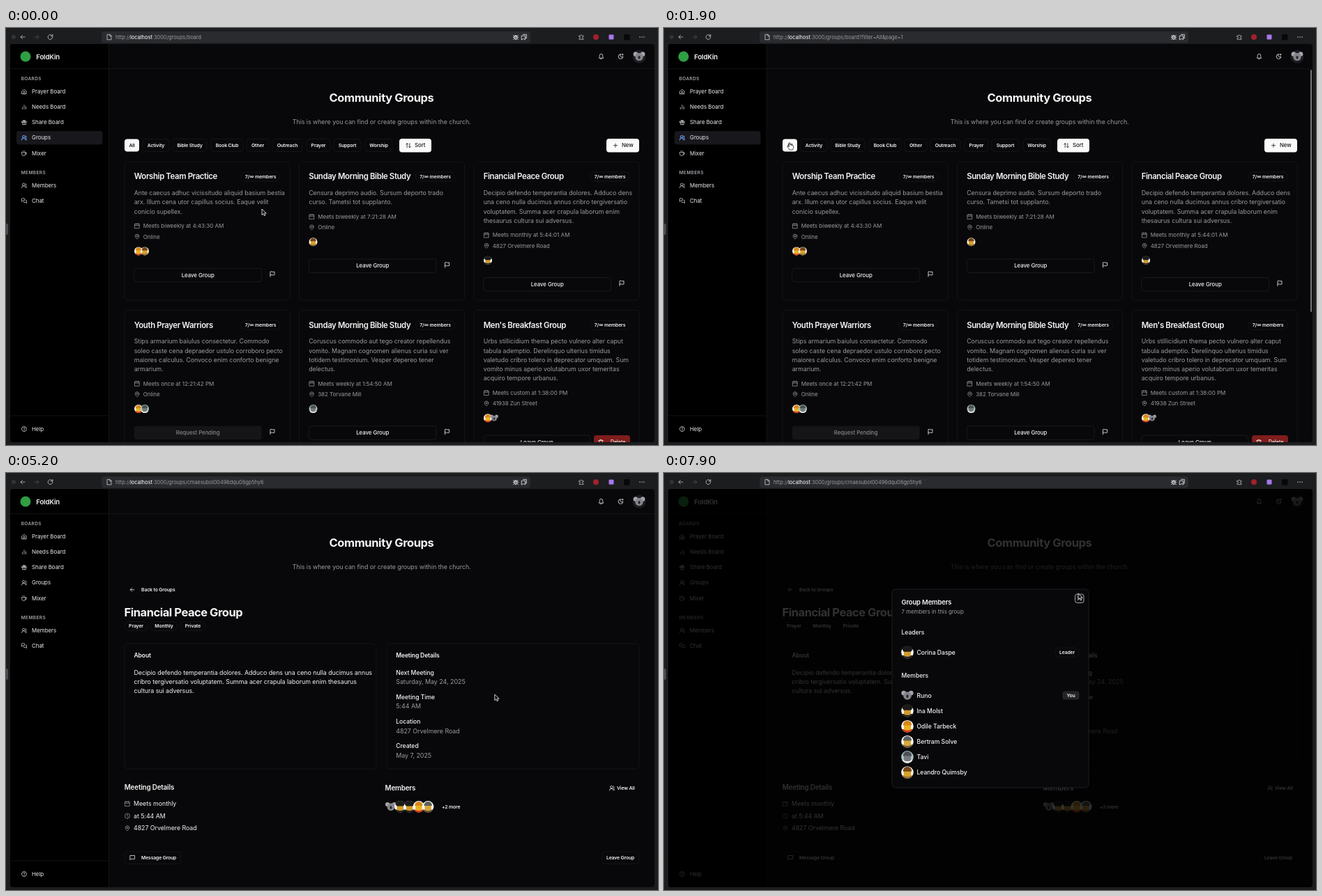
An HTML page that plays this animation: 935x599 px, repeating every 8000 ms.

```html
<!DOCTYPE html>
<html lang="en">
<head>
<meta charset="utf-8">
<title>Community Groups</title>
<style>
html, body { margin: 0; width: 100%; height: 100%; overflow: hidden; background: #1b1d1f; }
svg { display: block; width: 935px; height: 599px; font-family: Inter, "Liberation Sans", sans-serif; }
text { white-space: pre; }
</style>
</head>
<body>
<svg id="stage" viewBox="0 0 935 599"></svg>
<script>
const WHITE = '#f4f4f5', GRAY = '#9a9aa0', BG = '#08080a', LINE = '#19191d';

const ICONS = {
  home: 'M3 10l9-7 9 7v11H3zM9 21v-9h6v9',
  bars: 'M5 20v-6M12 20V4M19 20V10',
  gift: 'M3 8h18v4H3zM5 12v9h14v-9M12 8v13M12 8C6 8 6 3 9 3s3 5 3 5 0-5 3-5 3 5-3 5',
  users: 'M2 21a8 8 0 0 1 16 0M10 13a5 5 0 1 0 0-10 5 5 0 0 0 0 10M22 20c0-3-2-6-4-7a5 5 0 0 0 0-9',
  cup: 'M3 8h14v9a4 4 0 0 1-4 4H7a4 4 0 0 1-4-4zM17 8h1a4 4 0 0 1 0 8h-1M7 2v2M13 2v2',
  chat: 'M14 9a2 2 0 0 1-2 2H6l-4 4V4a2 2 0 0 1 2-2h8a2 2 0 0 1 2 2zM18 9h2a2 2 0 0 1 2 2v11l-4-4h-6a2 2 0 0 1-2-2v-1',
  help: 'M12 22a10 10 0 1 0 0-20 10 10 0 0 0 0 20M9 9a3 3 0 0 1 6 1c0 2-3 2-3 4M12 17v.5',
  calendar: 'M3 4h18v18H3zM3 10h18M8 2v4M16 2v4',
  pin: 'M20 10c0 6-8 12-8 12s-8-6-8-12a8 8 0 0 1 16 0M12 13a3 3 0 1 0 0-6 3 3 0 0 0 0 6',
  flag: 'M4 22V3c4-3 8 3 16 0v12c-8 3-12-3-16 0',
  bell: 'M4 17c2-3 2-5 2-9a6 6 0 0 1 12 0c0 4 0 6 2 9zM10 21h4',
  moon: 'M12 3a6 6 0 0 0 9 9 9 9 0 1 1-9-9M19 2v5M16.5 4.5h5',
  clock: 'M12 22a10 10 0 1 0 0-20 10 10 0 0 0 0 20M12 6v6l4 2',
  message: 'M21 3H3v18l4-4h14z',
  left: 'M20 12H4M11 5l-7 7 7 7',
  right: 'M4 12h16M13 5l7 7-7 7',
  reload: 'M20 12a8 8 0 1 1-3-6.2l3 3M20 3v6h-6',
  sort: 'M7 20V4M3 8l4-4 4 4M17 4v16M13 16l4 4 4-4',
  plus: 'M5 12h14M12 5v14',
  trash: 'M3 6h18M6 6v15h12V6M9 6V3h6v3',
  close: 'M6 6l12 12M18 6L6 18',
  file: 'M5 2h10l5 5v15H5zM14 2v6h6',
  reader: 'M4 2h16v20H4zM8 7h8M8 12h8M8 17h8',
  bug: 'M7 9h10v7a5 5 0 0 1-10 0zM8 9a4 4 0 0 1 8 0M2 13h5M17 13h5M3 5l4 4M21 5l-4 4M3 21l4-3M21 21l-4-3M12 10v11',
  pages: 'M8 2h13v15l-4-3M3 7h13v15l-6-4-7 4z',
  puzzle: 'M4 7h5a3 3 0 1 1 6 0h5v5a3 3 0 1 0 0 5v4H4v-5a3 3 0 1 0 0-5z'
};

// Markup helpers; cy is the visual middle of a line of text.
const text = (x, cy, str, size = 8.85, fill = WHITE, weight = 400, attrs = '', spacing = weight < 600 ? -.005 : -.018) =>
  `<text x="${x}" y="${cy + size * .35}" font-size="${size}" fill="${fill}" font-weight="${weight}" letter-spacing="${spacing}em" ${attrs}>${str}</text>`;
const mid = (x, cy, str, size, fill, weight, spacing) => text(x, cy, str, size, fill, weight, 'text-anchor="middle"', spacing);
const box = (x, y, w, h, fill = 'none', stroke = 'none', r = 4) =>
  `<rect x="${x}" y="${y}" width="${w}" height="${h}" rx="${r}" fill="${fill}" stroke="${stroke}" stroke-width=".8"/>`;
const dot = (x, y, r, fill) => `<circle cx="${x}" cy="${y}" r="${r}" fill="${fill}"/>`;
const line = d => `<path d="${d}" stroke="${LINE}" fill="none" stroke-width=".8"/>`;
const icon = (name, x, y, size = 9, color = WHITE) =>
  `<path d="${ICONS[name]}" transform="translate(${x - size / 2} ${y - size / 2}) scale(${size / 24})" fill="none" stroke="${color}" stroke-width="2.1" stroke-linecap="round" stroke-linejoin="round"/>`;
const group = (id, body, attrs = '') => `<g id="${id}" ${attrs}>${body}</g>`;
const badge = (x, cy, w, str) =>
  box(x, cy - 6.5, w, 13, BG, LINE, 6) + mid(x + w / 2, cy, str, 6.85, WHITE, 600);

// Avatars: backdrop, head, hair, clothes
const LOOKS = {
  brown: ['#f3efe6', '#d9a027', '#714518', '#8a6a3a'],
  red: ['#fff', '#eab320', '#d9881a', '#d6351d'],
  dark: ['#fff', '#d09a2c', '#1c1a18', '#242220'],
  gray: ['#fff', '#d9a838', '#5c6058', '#6b5a3a'],
  pale: ['#a9c4c6', '#77797c', '#4c5055', '#ecefee']
};
function avatar(x, y, r, kind) {
  const at = `<g transform="translate(${x} ${y}) scale(${r})">`;
  if (kind === 'koala') return at + dot(-.6, -.4, .38, '#a5a5ad') + dot(.6, -.4, .38, '#a5a5ad') +
    dot(0, .05, .66, '#84848d') + '<ellipse cy=".15" rx=".18" ry=".28" fill="#26262b"/></g>';
  const [back, head, hair, body] = LOOKS[kind];
  const top = kind === 'dark' ? 'M-.87-.5A1 1 0 0 1 .87-.5L.6-.1H-.6z' : 'M-.7-.15C-.75-1.15 .75-1.15 .7-.15z';
  return at + dot(0, 0, 1, back) + `<path d="M-.87 .5A1 1 0 0 0 .87 .5z" fill="${body}"/>` +
    box(-.58, -.6, 1.16, 1.3, head, 'none', .4) + `<path d="${top}" fill="${hair}"/></g>`;
}

function chips(active) {
  const list = [['All', 170, 21], ['Activity', 196, 38], ['Bible Study', 239, 49], ['Book Club', 294, 46], ['Other', 345, 32],
    ['Outreach', 382, 43], ['Prayer', 431, 34], ['Support', 470, 39], ['Worship', 515, 39]];
  return list.map(([name, x, w]) => {
    const on = name === active;
    return box(x, 159.5, w, 18, on ? '#fafafa' : BG, on ? 'none' : LINE) + mid(x + w / 2, 168.7, name, 6.85, on ? '#18181b' : WHITE, 600);
  }).join('') +
    box(564, 159, 46, 19.5, '#fafafa') + icon('sort', 577, 168.7, 9, '#18181b') + text(586, 168.7, 'Sort', 7.8, '#18181b', 500) +
    box(861, 159, 47, 19.5, '#fafafa') + icon('plus', 874, 168.7, 9, '#18181b') + text(883, 168.7, 'New', 7.8, '#18181b', 500);
}

function card(x, y, [title, body, when, where, faces, mode]) {
  const lines = body.split('|'), last = y + 45 + (lines.length - 1) * 13.25, tx = x + 13.7;
  let out = box(x, y, 237, 199, BG, LINE, 5) +
    text(tx, y + 21.5, title, 11.4, WHITE, 600, 'class="title"', -.033) +
    badge(x + 167, y + 21.5, 56, '7/∞ members') +
    lines.map((s, i) => text(tx, y + 45 + i * 13.25, s, 8.87, GRAY)).join('') +
    icon('calendar', x + 18, last + 20.7, 8.5, GRAY) + text(x + 26.7, last + 20.7, 'Meets ' + when, 8.1, GRAY) +
    icon('pin', x + 18, last + 36.2, 8.5, GRAY) + text(x + 26.7, last + 36.2, where, 8, GRAY) +
    faces.split(' ').map((k, i) => avatar(x + 20 + i * 9, last + 57, 6, k)).join('');
  const by = last + 91.5, pending = mode === 'pending', owner = mode === 'owner', w = owner ? 153 : 183;
  out += box(tx, by - 9.75, w, 19.5, pending ? '#151518' : BG, pending ? 'none' : '#1f1f25') +
    mid(tx + w / 2, by, pending ? 'Request Pending' : 'Leave Group', 7.85, pending ? '#85858c' : WHITE, 500);
  return out + (owner
    ? box(x + 172, by - 9.75, 52, 19.5, '#7f1d1d') + icon('trash', x + 182, by, 9) + text(x + 196, by, 'Delete', 7, WHITE, 500)
    : icon('flag', x + 212, by - 1.5, 9));
}

const ROAD = '4827 Orvelmere Road';
const CARDS = [
  ['Worship Team Practice', 'Ante caecus adhuc vicissitudo aliquid basium bestia|arx. Illum cena utor capillus socius. Eaque velit|conicio supellex.', 'biweekly at 4:43:30 AM', 'Online', 'red brown'],
  ['Sunday Morning Bible Study', 'Censura deprimo audio. Sursum deporto trado|curso. Tametsi tot supplanto.', 'biweekly at 7:21:28 AM', 'Online', 'brown'],
  ['Financial Peace Group', 'Decipio defendo temperantia dolores. Adduco dens|una ceno nulla ducimus annus cribro tergiversatio|voluptatem. Summa acer crapula laborum enim|thesaurus cultura sui adversus.', 'monthly at 5:44:01 AM', ROAD, 'dark'],
  ['Youth Prayer Warriors', 'Stips armarium baiulus consectetur. Commodo|soleo caste cena depraedor ustulo corroboro pecto|maiores calculus. Convoco enim conforto benigne|armarium.', 'once at 12:21:42 PM', 'Online', 'red pale', 'pending'],
  ['Sunday Morning Bible Study', 'Coruscus commodo aut tego creator repellendus|vomito. Magnam cognomen alienus curia sui ver|totidem testimonium. Vesper depereo tener|delectus.', 'weekly at 1:54:50 AM', '382 Torvane Mill', 'pale'],
  ['Men\'s Breakfast Group', 'Urbs stillicidium thema pecto vulnero alter caput|tabula ademptio. Derelinquo ulterius timidus|valetudo cribro tolero in deprecator umquam. Sum|vomito minus aperio volutabrum uxor temeritas|acquiro tempore urbanus.', 'custom at 1:38:00 PM', '41938 Zun Street', 'red koala', 'owner']
];
const ACTIVITY = ['Marriage Enrichment', 'Bis demens abutor comptus abduco tres depopulo|ustulo certe. Caelum tribuo aegrus dolores|occaecati. Curatio vomica ustulo aliqua xiphias|cognatus attonbitus perspiciatis.', 'once at 7:04:21 AM', 'Online', 'brown'];

function browser() {
  return box(0, 0, 935, 599, '#1b1d1f', 'none', 0) + box(137, 5, 615, 16.5, '#2a2b2e') +
    dot(11, 13, 3, '#323436') + box(-3, 281, 6, 16, '#4a4a50', 'none', 2) +
    icon('left', 24, 13, 9, '#c4c4c8') + icon('right', 44, 13, 9, '#505256') + icon('reload', 63.5, 13, 10, '#c4c4c8') +
    icon('file', 148, 13, 9, '#d0d0d4') +
    text(157, 13.4, 'http://<tspan fill="#e8e8ea" font-weight="500">localhost</tspan>:3000/groups/<tspan id="path"></tspan>', 7.33, '#9b9ba0', 400, '', 0) +
    group('reader', icon('reader', 719, 13, 9)) + icon('bug', 731, 13, 9) + icon('pages', 743, 13, 9) +
    icon('puzzle', 825, 13, 9, '#b8b8bc') + dot(846, 13, 4, '#a3202c') + box(864.5, 9.5, 7, 7, '#a678e8', 'none', 1) +
    box(886, 9, 8.5, 8.5, '#08080a', 'none', 1) + [909, 912, 915].map(x => dot(x, 13, .8, '#b8b8bc')).join('');
}

function shell() {
  const nav = [['home', 'Prayer Board', 91.5], ['bars', 'Needs Board', 113.5], ['gift', 'Share Board', 135.5], ['users', 'Groups', 157.7],
    ['cup', 'Mixer', 180], ['users', 'Members', 226.3], ['chat', 'Chat', 248.3], ['help', 'Help', 576]];
  const head = (y, s) => text(21.7, y, s, 6.5, '#a4a4ab', 600, '', .06);
  return box(6, 23, 924, 572, BG, 'none', 0) + box(6, 23, 141, 572, '#000', 'none', 0) +
    line('M6 58.5H930M147 23V595M6 557H147') +
    dot(28, 41, 7.5, '#2f9e44') + text(43.3, 41.5, 'FoldKin', 9.6, WHITE, 600) +
    head(72.7, 'BOARDS') + head(207.7, 'MEMBERS') +
    group('active', box(15, 148, 123.5, 19.5, '#17171c')) +
    nav.map(([name, label, y]) => icon(name, 26, y, 8.5, '#d8d8dc') + text(37, y, label, 7.95, '#ececee')).join('') +
    group('blue', icon('users', 26, 157.7, 8.5, '#3b82f6')) +
    icon('bell', 853.5, 41, 9) + icon('moon', 881.5, 41, 9) +
    dot(908, 41, 9.5, '#1d1d22') + avatar(908, 41, 8.5, 'koala') +
    mid(538.5, 100.7, 'Community Groups', 16.5, WHITE, 700, -.025) +
    mid(538.7, 134.5, 'This is where you can find or create groups within the church.', 8.85, GRAY);
}

function detail() {
  const facts = [['Next Meeting', 'Saturday, May 24, 2025'], ['Meeting Time', '5:44 AM'], ['Location', ROAD], ['Created', 'May 7, 2025']];
  const about = ['Decipio defendo temperantia dolores. Adduco dens una ceno nulla ducimus annus', 'cribro tergiversatio voluptatem. Summa acer crapula laborum enim thesaurus', 'cultura sui adversus.'];
  const meta = [['calendar', 'Meets monthly'], ['clock', 'at 5:44 AM'], ['pin', ROAD]];
  return icon('left', 181, 167.7, 8.5) + text(194, 167.7, 'Back to Groups', 6.85, WHITE, 600) +
    text(169.5, 200.3, 'Financial Peace Group', 16.5, WHITE, 700, '', -.028) +
    badge(170, 220, 33, 'Prayer') + badge(207, 220, 39, 'Monthly') + badge(250, 220, 36, 'Private') +
    box(170, 245, 361, 180, BG, LINE, 5) + box(546, 245, 362, 180, BG, LINE, 5) +
    text(183.5, 262.3, 'About', 8.6, WHITE, 600) + text(559.2, 262.3, 'Meeting Details', 8.6, WHITE, 600) +
    about.map((s, i) => text(183.5, 286.5 + i * 13.25, s, 8.87)).join('') +
    facts.map(([k, v], i) => text(559.2, 286.5 + i * 35.3, k, 8.65, WHITE, 500) + text(559.2, 299.8 + i * 35.3, v, 8.95, GRAY)).join('') +
    text(169.7, 452, 'Meeting Details', 9.85, WHITE, 600) +
    meta.map(([k, v], i) => icon(k, 174, 475 + i * 17.7, 8.5, GRAY) + text(183, 475 + i * 17.7, v)).join('') +
    text(543.5, 453, 'Members', 9.85, WHITE, 600) +
    ['koala', 'dark', 'dark', 'red', 'gray'].map((k, i) => avatar(552 + i * 13.3, 479.3, 8.2, k)).join('') +
    text(625, 479.5, '+2 more', 6.8, WHITE, 600) +
    icon('users', 869, 452.7, 8.5) + text(876, 452.7, 'View All', 6.8, WHITE, 600) +
    box(170, 544, 81, 17.5, BG, LINE) + icon('message', 181, 552.7, 8.5) + text(194, 552.7, 'Message Group', 6.8, WHITE, 600) +
    box(855, 544, 52.5, 17.5, BG, LINE) + mid(881, 552.7, 'Leave Group', 6.8, WHITE, 600);
}

function modal() {
  const people = [['Runo', 'koala'], ['Ina Molst', 'dark'], ['Odile Tarbeck', 'red'], ['Bertram Solve', 'gray'], ['Tavi', 'pale'], ['Leandro Quimsby', 'brown']];
  const row = (y, name, look) => avatar(349, y, 8.8, look) + text(362.5, y, name, 8.67, WHITE, 500);
  return box(6, 23, 924, 572, '#000c', 'none', 0) + box(327, 167, 282, 285, BG, '#24242c', 5) +
    text(340.5, 185.3, 'Group Members', 9.5, WHITE, 600) + text(340.5, 199, '7 members in this group', 7.9, GRAY) +
    box(589.5, 174, 12.5, 12.5, '#111114', '#c8c8cc', 3) + icon('close', 595.7, 180.2, 9) +
    text(340.5, 228.7, 'Leaders', 8.6, WHITE, 500) + row(257.6, 'Corina Daspe', 'dark') + badge(561, 257.6, 34, 'Leader') +
    text(340.5, 290.7, 'Members', 8.6, WHITE, 500) +
    people.map(([name, look], i) => row(319.5 + i * 22.1, name, look)).join('') +
    box(571.5, 313.5, 24, 12, '#242428', 'none', 3) + mid(583.5, 319.5, 'You', 6.8, WHITE, 600);
}

const $ = id => document.getElementById(id);
$('stage').innerHTML = '<clipPath id="window"><rect x="6" y="23" width="924" height="572" rx="4"/></clipPath>' + browser() +
  group('page', shell() +
    group('list', chips('All') + CARDS.map((c, i) => card(170 + i % 3 * 250.5, i < 3 ? 192 : 405.3, c)).join('')) +
    group('activity', chips('Activity') + card(170, 192, ACTIVITY)) +
    group('detail', detail()) +
    group('modal', modal()) +
    group('scroll', box(927, 60, 2, 348, '#77777d', 'none', 1)), 'clip-path="url(#window)"') +
  group('status', box(5, 584, 183, 11, '#232327', '#39393e', 2) +
    text(8, 589.7, '', 6.18, '#b4b4b9', 400, 'id="link"', 0)) +
  group('pointer',
    group('ring', '<circle r="16.5" fill="#77777a" fill-opacity=".18" stroke="#6c6c70" stroke-width="1.5"/>') +
    group('arrow', '<path d="M0 0v8.5l2-1.8 1.4 3 1.5-.7-1.4-2.9h2.8z" fill="#08080a" stroke="#fff" stroke-width=".8"/>') +
    group('hand', '<path d="M-.7 0q.9-.9 1.7 0v3q1-.5 1.5.3 1-.4 1.5.5 1.4-.3 1.5 1v2q0 1.500-1 3.2H0Q-1 8-3 5.5q0-1.2 1.2-.8l1.1 1z" fill="#fff" stroke="#111" stroke-width=".7"/>'));

const DURATION = 8000;
const PATH = [[0, 367, 260], [150, 367, 260], [700, 214, 166], [1000, 214, 166], [1400, 180, 165], [1900, 180, 165], [2600, 268, 211],
  [2900, 268, 211], [3400, 742, 208], [4500, 742, 208], [6100, 641, 478], [6900, 641, 478], [7800, 594, 173], [DURATION, 594, 173]];
const CLICKS = [780, 1450, 3430, 6430];
const TITLES = [[184, 117], [434, 145], [685, 113]];
const ID = { first: 'cmaesubom004d6dqu3kkxel8b', third: 'cmaesubol00496dqu08gp5hy6' };
const titles = [...document.querySelectorAll('#list .title')].slice(0, 3);
const show = (id, on) => $(id).style.display = on ? '' : 'none';

function cursorAt(t) {
  const i = Math.max(1, PATH.findIndex(k => k[0] > t));
  const [t0, x0, y0] = PATH[i - 1], [t1, x1, y1] = PATH[i];
  const p = (t - t0) / (t1 - t0), e = p * p * (3 - 2 * p);
  return [x0 + (x1 - x0) * e, y0 + (y1 - y0) * e];
}

function render(t) {
  const [x, y] = cursorAt(t);
  const scene = t >= 3600 ? 'detail' : t >= 900 && t < 1700 ? 'activity' : 'list';
  const open = t >= 6600, inside = (l, top, w, h) => x >= l && x <= l + w && y >= top && y <= top + h;
  for (const id of ['list', 'activity', 'detail']) show(id, id === scene);
  show('modal', open);
  show('active', scene !== 'detail');
  show('blue', scene !== 'detail');
  show('scroll', t >= 1700 && t < 3600);
  show('reader', t >= 2000 && t < 3600);
  $('path').textContent = scene === 'detail' ? ID.third : t < 900 ? 'board' :
    `board?filter=${scene === 'list' ? 'All' : 'Activity'}&page=1`;

  let hot = scene === 'detail' ? !open && inside(620, 472, 36, 14) : inside(170, 159, 384, 19);
  titles.forEach((el, i) => {
    const over = scene === 'list' && inside(TITLES[i][0], 207, TITLES[i][1], 13);
    el.setAttribute('text-decoration', over ? 'underline' : 'none');
    hot = hot || over;
  });
  const link = t >= 2500 && t < 3000 ? ID.first : t >= 3300 && t < 4300 ? ID.third : '';
  show('status', link);
  $('link').textContent = 'http://localhost:3000/groups/' + link;

  $('pointer').setAttribute('transform', `translate(${x} ${y})`);
  show('ring', CLICKS.some(c => t >= c && t < c + 150));
  show('hand', hot);
  show('arrow', !hot);
}

(function tick() {
  render(performance.now() % DURATION);
  requestAnimationFrame(tick);
})();
</script>
</body>
</html>
```
